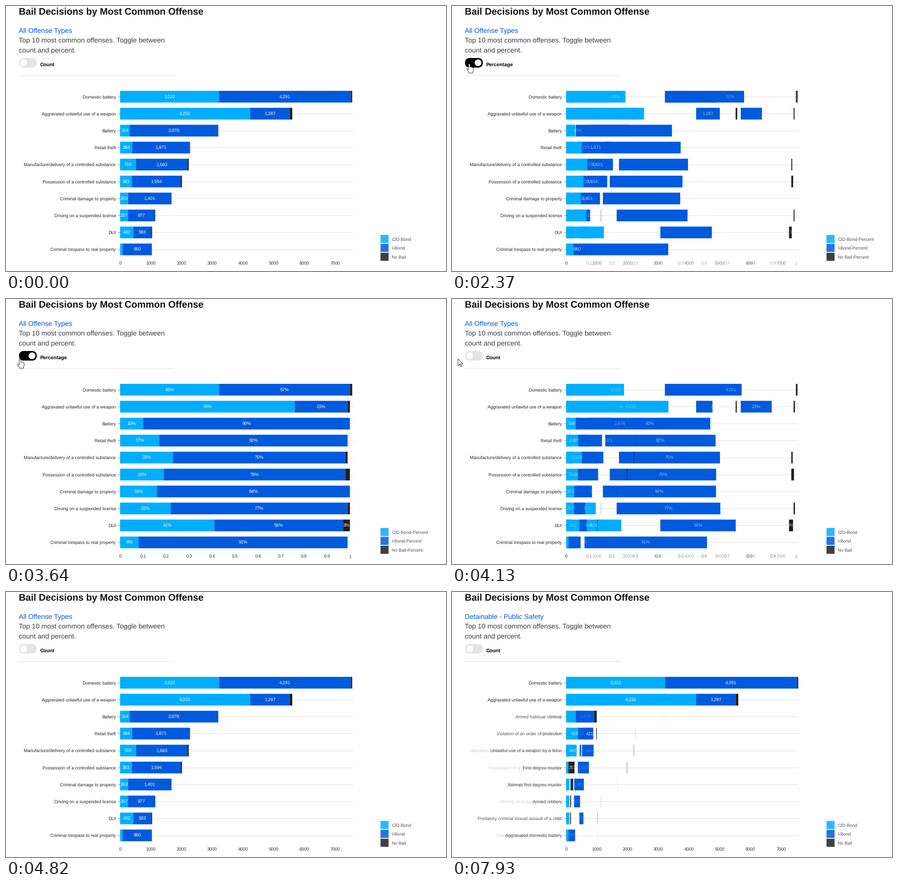
Recreate the animation shown at these times as a matplotlib script. Size 964 by 581 pixels, loop 8 s.

```python
import math

import matplotlib.pyplot as plt
import numpy as np
from matplotlib.animation import FuncAnimation
from matplotlib.patches import Circle, FancyBboxPatch, Polygon, Rectangle

W, H, DPI = 964, 581, 64
PX = 72 / DPI
LOOP, STEP = 8000, 40
TICK = 200 / 3                      # motion advances at 15 steps a second
TOGGLE_ON, TOGGLE_OFF, RENAME, SWAP = 2240, 4010, 6810, 7790

X0, X1 = 250, 758.5
ROW_Y, ROW_STEP, BAR_H = 186, 37.2, 25.7
COUNT_PX = (X1 - X0) / 7555
SHARE_PX = (X1 - X0) / 1.01
COLORS = ["#00aeff", "#005add", "#1f1f1f"]
FADED = ["#29b9ff", "#2673e1", "#404040"]
KEYS = ["C/D-Bond", "I-Bond", "No Bail"]
SMALL = 9.75

OFFENSES = [
    ("Domestic battery", (3222, 4291, 42), (43, 57, 1)),
    ("Aggravated unlawful use of a weapon", (4232, 1287, 85), (76, 23, 1)),
    ("Battery", (314, 2878, 5), (10, 90, 0)),
    ("Retail theft", (394, 1871, 12), (17, 82, 0)),
    ("Manufacture/delivery of a controlled substance", (516, 1683, 35), (23, 75, 1)),
    ("Possession of a controlled substance", (383, 1594, 35), (19, 79, 2)),
    ("Criminal damage to property", (263, 1401, 8), (16, 84, 0)),
    ("Driving on a suspended license", (257, 877, 12), (22, 77, 1)),
    ("DUI", (432, 583, 27), (41, 56, 3)),
    ("Criminal trespass to real property", (80, 950, 5), (8, 91, 0)),
]
DETAINABLE = [
    ("Armed habitual criminal", (921, 0, 97)),
    ("Violation of an order of protection", (559, 421, 25)),
    ("Unlawful use of a weapon by a felon", (442, 60, 0)),
    ("First degree murder", (75, 3, 253)),
    ("Attempt first degree murder", (134, 28, 86)),
    ("Armed robbery", (134, 0, 35)),
    ("Predatory criminal sexual assault of a child", (130, 0, 35)),
    ("Aggravated domestic battery", (130, 10, 0)),
]

plt.rcParams["font.family"] = "Liberation Sans"
plt.rcParams["text.hinting"] = "none"

fig = plt.figure(figsize=(W / DPI, H / DPI), dpi=DPI, facecolor="white")
ax = fig.add_axes([0, 0, 1, 1])
ax.set_xlim(0, W)
ax.set_ylim(H, 0)
ax.axis("off")


def write(x, y, s, size=SMALL, color="#333333", ha="left", weight="normal", z=3):
    return ax.text(x, y, s, fontsize=size * PX, color=color, ha=ha,
                   va="baseline", weight=weight, zorder=z)


def box(x, y, w, h, color, z=2):
    return ax.add_patch(Rectangle((x, y), w, h, fc=color, lw=0, zorder=z, snap=False))


def mid(row):
    return ROW_Y + BAR_H / 2 + row * ROW_STEP


def row_label(row, name):
    return write(241, mid(row) + 3.6, name, color="#262626", ha="right")


def make_bars(rows, first, scale, fmt):
    bars = []
    for row, values in enumerate(rows, first):
        x = X0
        for key, value in enumerate(values):
            w = value * scale
            if value:
                rect = box(x, ROW_Y + row * ROW_STEP, w, BAR_H, COLORS[key])
                label = None
                if w > 15:
                    label = write(x + w / 2, mid(row) + 3.6, fmt(value),
                                  color="white", ha="center")
                bars.append((key, x, w, rect, label))
            x += w
    return bars


def show(bars, p, base=10, stride=1, entering=False):
    """Scale bars from their left edge; entering labels wait at their final place."""
    for key, x, w, rect, label in bars:
        z = base + stride * key
        rect.set_visible(p > 0)
        rect.set_width(w * p)
        rect.set_zorder(z)
        if label:
            label.set_visible(p > 0)
            label.set_alpha(p)
            label.set_zorder(z + 0.5)
            label.set_x(x + w / 2 * (1 if entering else p))


def fade(texts, alpha):
    for text in texts:
        text.set_visible(alpha > 0)
        text.set_alpha(alpha)


def spring(t, start, mark):
    """Critically damped approach from 0 to 1, held between ticks."""
    held = mark + TICK * math.floor((t - mark) / TICK)
    x = 0.013 * max(held - start, 0)
    p = 1 - (1 + x) * math.exp(-x)
    return 1 if p > 0.998 else p


# Heading and switch
write(28.3, 19, "Bail Decisions by Most Common Offense", 20.8, "#111111", weight="bold")
link = write(28.3, 59, "", 15, "#005ad6")
write(28.3, 80.3, "Top 10 most common offenses. Toggle between", 15.1, "#3d3d3d")
write(28.3, 101.6, "count and percent.", 15.1, "#3d3d3d")
mode = write(74.3, 131.6, "", 10.95, "black", weight="bold")
track = ax.add_patch(FancyBboxPatch((39, 124.5), 18, 0, lw=0, zorder=2,
                                    boxstyle="round,pad=10.5,rounding_size=10.5"))
knob = ax.add_patch(Circle((38.7, 124.5), 7.4, fc="white", lw=0, zorder=3))
ax.plot([28, 368], [152, 152], color="#e2e2e2", lw=1.2 * PX, zorder=1)

# Chart frame
for row in range(10):
    ax.plot([X0, X1], [mid(row)] * 2, color="#dddddd", lw=PX, zorder=1)
    ax.plot([X0 - 5, X0], [mid(row)] * 2, color="#777777", lw=PX, zorder=2,
            solid_capstyle="butt")
write(X0, 567.7, "0", ha="center")
count_ticks = [write(X0 + n * 1000 * COUNT_PX, 567.7, str(n * 1000), ha="center")
               for n in range(1, 8)]
share_ticks = [write(X0 + n / 10 * SHARE_PX, 567.7, f"{n / 10:g}", ha="center")
               for n in range(1, 11)]

names = [row_label(row, o[0]) for row, o in enumerate(OFFENSES)]
new_names = [row_label(row, d[0]) for row, d in enumerate(DETAINABLE, 2)]

legend = []
for n, color in enumerate(FADED):
    box(820.5, 502 + 19.5 * n, 17.7, 17.7, color)
    legend.append(write(845.2, 514.5 + 19.5 * n, "", color="#525252"))

# Bars
counts = [o[1] for o in OFFENSES]
top = make_bars(counts[:2], 0, COUNT_PX, "{:,}".format)
rest = make_bars(counts[2:], 2, COUNT_PX, "{:,}".format)
share = make_bars([o[2] for o in OFFENSES], 0, SHARE_PX / 100, "{}%".format)
later = make_bars([d[1] for d in DETAINABLE], 2, COUNT_PX, "{:,}".format)

# Pointer
ARROW = np.array([(0, 0), (0, 15.5), (3.6, 12.2), (6, 17.4), (8.2, 16.4),
                  (5.9, 11.3), (10.8, 11.3)])
HAND = np.array([(-1.6, 1), (0, 0), (1.6, 1), (1.8, 6.6), (4, 6.8), (6.2, 7.6),
                 (8.4, 8.6), (9.4, 10.2), (9.2, 14), (7.6, 17), (7.6, 20),
                 (-1, 20), (-1.5, 17.4), (-5, 13), (-5.3, 10.8), (-3.8, 10.2),
                 (-1.6, 12.4)])
PATH_T = [1450, 1750, 2100, 2440, 2640, 3440, 3800, 4020, 4130]
PATH_X = [9, 52, 38, 38, -14, 14, 40, 40, 13]
PATH_Y = [141, 117, 127, 127, 138, 142, 126, 126, 131]
pointer = ax.add_patch(Polygon(ARROW, fc="white", ec="#333333", lw=PX, zorder=50,
                               joinstyle="round"))


def move_pointer(t):
    x, y = np.interp(t, PATH_T, PATH_X), np.interp(t, PATH_T, PATH_Y)
    over = 28 < x < 68 and 114 < y < 136
    pointer.set_visible(1450 <= t < 2640 or 3440 <= t <= 4190)
    pointer.set_xy((HAND if over else ARROW) + (x, y))


def set_switch(t):
    on = np.interp(t, [TOGGLE_ON, TOGGLE_ON + 100, TOGGLE_OFF, TOGGLE_OFF + 100],
                   [0, 1, 1, 0])
    track.set_facecolor([0.894 * (1 - on)] * 3)
    knob.set_center((38.7 + 18.3 * on, 124.5))
    percent = TOGGLE_ON <= t < TOGGLE_OFF
    mode.set_text("Percentage" if percent else "Count")
    for text, key in zip(legend, KEYS):
        text.set_text(key + "-Percent" * percent)


def update(i):
    t = i * STEP + 30
    set_switch(t)
    move_pointer(t)
    link.set_text("All Offense Types" if t < RENAME else "Detainable - Public Safety")

    swapped = spring(t, 7712, 7930) if t >= SWAP else 0
    if t < TOGGLE_OFF:
        percent = spring(t, 2264, 2370)
        show(top + rest, 1 - percent)
        show(share, percent, 20, entering=True)
        show(later, 0)
    else:
        percent = 1 - spring(t, 4021, 4130)
        show(share, percent)
        show(top, 1 - percent, 20, entering=True)
        if swapped:
            show(rest, 1 - swapped, 10, 2)
        else:
            show(rest, 1 - percent, 20, entering=True)
        show(later, swapped, 11, 2, True)

    fade(count_ticks, 1 - percent)
    fade(share_ticks, percent)
    fade(names[2:], 1 - swapped)
    fade(new_names, swapped)
    return []


anim = FuncAnimation(fig, update, frames=LOOP // STEP, interval=STEP,
                     repeat=True, repeat_delay=0)
plt.show()
```
